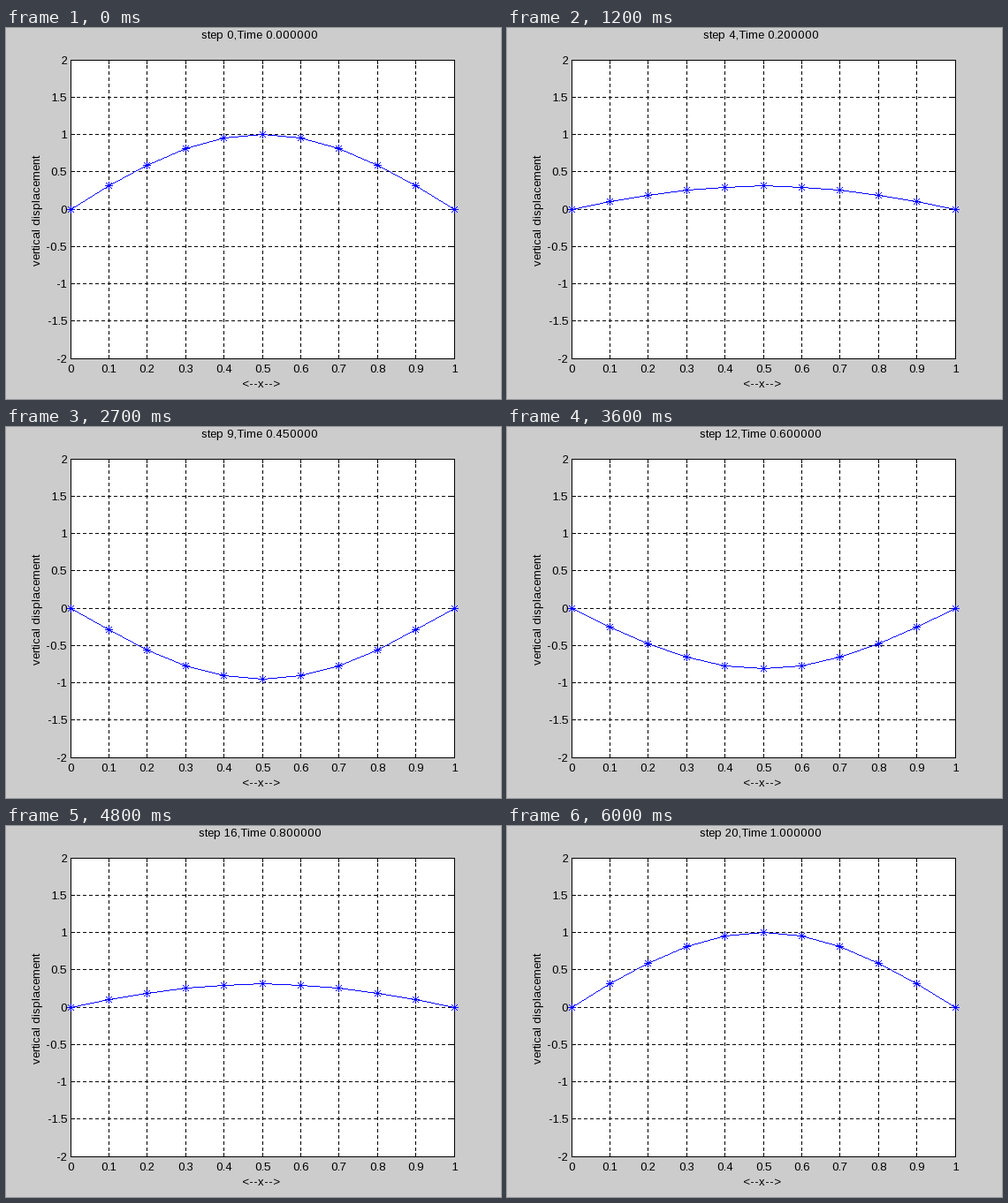
A matplotlib script for the animation above (6.3 s loop, 560 px wide and 420 px high).

```python
import numpy as np
import matplotlib.pyplot as plt
from matplotlib.animation import FuncAnimation

W, H, DPI = 560, 420, 100
LEFT, RIGHT, TOP, BOTTOM = 73, 507, 36, 374
STEPS, INTERVAL = 21, 300
TICK = 4
PX = 72 / DPI  # one pixel in points

plt.rcParams.update({
    "font.family": "Liberation Sans",
    "font.size": 13 * PX,
    "text.hinting": "force_autohint",
    "text.hinting_factor": 1,
    "path.snap": False,
    "path.simplify": False,
})

fig = plt.figure(figsize=(W / DPI, H / DPI), dpi=DPI, facecolor="#cccccc")
ax = fig.add_axes([0, 0, 1, 1])
ax.set_xlim(-0.5, W - 0.5)
ax.set_ylim(H - 0.5, -0.5)
ax.axis("off")


def to_x(x):
    return np.floor(LEFT + (RIGHT - LEFT) * x + 1e-6)


def to_y(y):
    return np.floor(TOP + (BOTTOM - TOP) * (2 - y) / 4 + 1e-6)


def stroke(xs, ys, color="black", width=1, **kw):
    return ax.plot(xs, ys, color=color, lw=width * PX, antialiased=False, **kw)[0]


def label(x, y, text, ha="center", **kw):
    return ax.text(x, y, text, ha=ha, va="baseline", **kw)


def pixel_path(xs, ys):
    """One tiny dash inside each pixel, so that exactly that pixel is filled."""
    px = xs[:, None] + np.array([-0.2, 0.2, np.nan])
    return px.ravel(), np.repeat(ys, 3)


ax.fill([LEFT, RIGHT, RIGHT, LEFT], [TOP, TOP, BOTTOM, BOTTOM],
        color="white", lw=0, antialiased=False)

dashes = dict(linestyle=(0, (4, 3)), dash_capstyle="butt")

for v in np.arange(11) / 10:
    x = to_x(v)
    if 0 < v < 1:
        stroke([x, x], [BOTTOM + 0.5, TOP - 0.5], **dashes)
        stroke([x, x], [TOP, TOP + TICK])
        stroke([x, x], [BOTTOM, BOTTOM - TICK])
    label(x, 389.5, f"{v:g}")

for v in np.arange(-4, 5) / 2:
    y = to_y(v)
    if abs(v) < 2:
        stroke([LEFT - 0.5, RIGHT + 0.5], [y, y], **dashes)
        stroke([LEFT, LEFT + TICK], [y, y])
        stroke([RIGHT, RIGHT - TICK], [y, y])
    label(69, y + 4.5, f"{v:g}", ha="right")

stroke([LEFT, RIGHT, RIGHT, LEFT, LEFT], [TOP, TOP, BOTTOM, BOTTOM, TOP],
       solid_joinstyle="miter")

label(288, 406.5, "<--x-->")
label(38.5, 206.5, "vertical displacement", rotation=90, rotation_mode="anchor")
title = label(286.5, 11.5, "")

# Eight-ray star as pixel offsets
arm, diag = np.arange(-4, 5), np.arange(-3, 4)
star_x = np.concatenate([arm, 0 * arm, diag, diag])
star_y = np.concatenate([0 * arm, arm, diag, -diag])

nodes = np.linspace(0, 1, 11)
node_x = to_x(nodes)
columns = np.arange(LEFT, RIGHT + 1)
curve = stroke([], [], "blue", 0.4, solid_capstyle="butt")


def draw(step):
    t = step * 0.05
    node_y = to_y(np.cos(2 * np.pi * t) * np.sin(np.pi * nodes))
    line_y = np.floor(np.interp(columns, node_x, node_y) + 0.5)
    xs = np.concatenate([columns, np.add.outer(node_x, star_x).ravel()])
    ys = np.concatenate([line_y, np.add.outer(node_y, star_y).ravel()])
    curve.set_data(*pixel_path(xs, ys))
    title.set_text(f"step {step},Time {t:f}")
    return curve, title


anim = FuncAnimation(fig, draw, frames=STEPS, interval=INTERVAL,
                     repeat=True, repeat_delay=0, blit=False)
plt.show()
```
